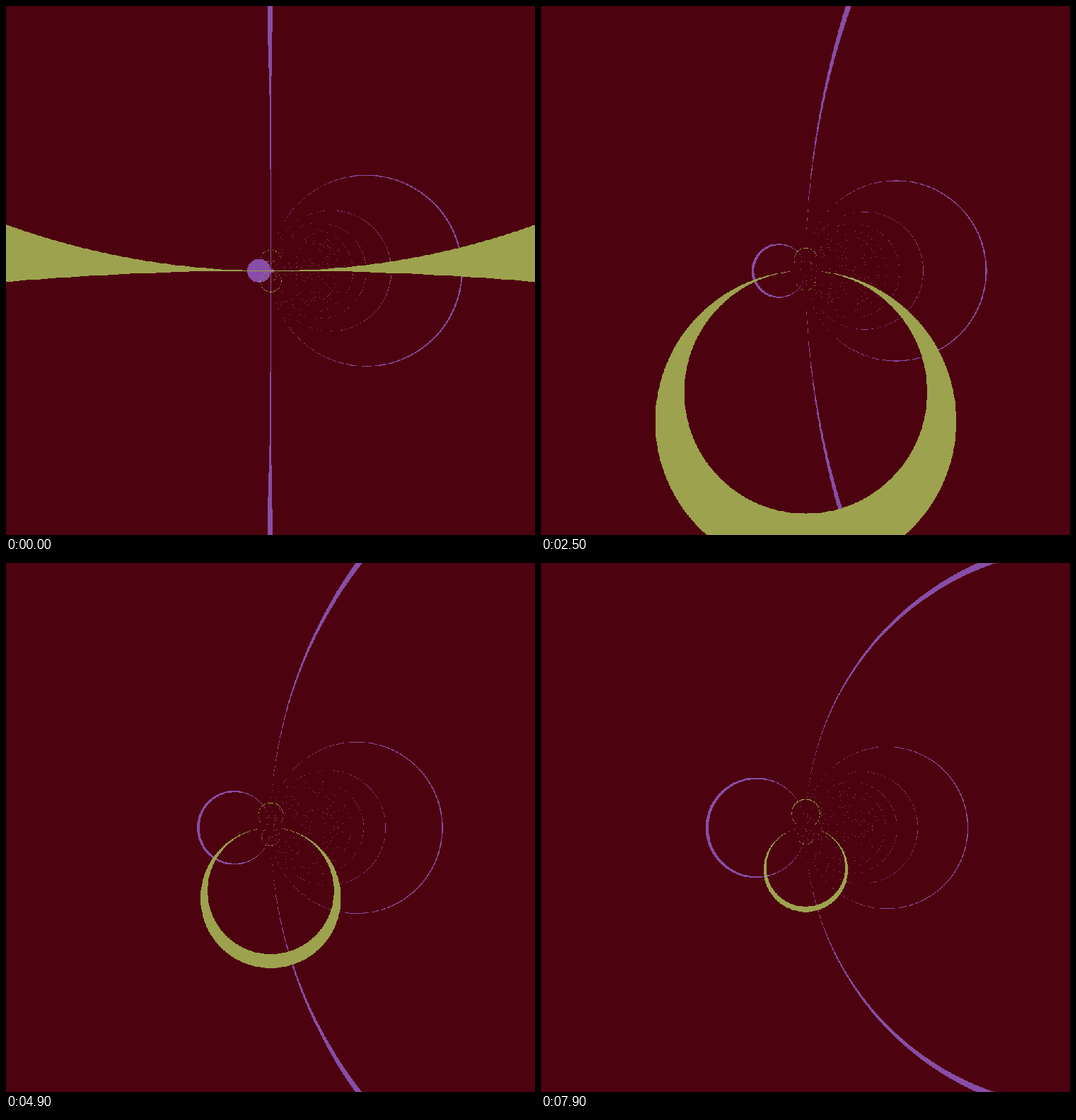
Recreate the animation shown at these times as an HTML page with a canvas. Size 748 px wide and 748 px high, loop 8 s.

```html
<!DOCTYPE html>
<html>
<head>
<meta charset="utf-8">
<style>
  html, body { margin: 0; width: 100%; height: 100%; overflow: hidden; background: #4d030f; }
  canvas { display: block; }
</style>
</head>
<body>
<canvas id="stage" width="748" height="748"></canvas>
<script>
const SIZE = 748, GRID = 1000, HALF = GRID / 2;
const STEPS = 300, FRAMES = 80, FRAME_MS = 100;
const RING_LEAD = 0.0068, RING_WIDTH = 0.0105;
const RAY_LEAD = 0.01345, RAY_WIDTH = 0.0168;
const ctx = document.getElementById('stage').getContext('2d');
const image = ctx.createImageData(SIZE, SIZE);
const pixels = new Uint32Array(image.data.buffer);
const rgb = (r, g, b) => (255 << 24 | b << 16 | g << 8 | r) >>> 0;
const BACK = rgb(77, 3, 15), RING = rgb(136, 77, 167), RAY = rgb(157, 162, 78);
const frac = v => v - Math.floor(v);

// The plane is sampled on a 1000-point grid, nearest point per pixel.
const toGrid = p => Math.floor((p + 0.5) * GRID / SIZE) - HALF;

// Polar form of exp(1 / 2z): fractional modulus and argument in turns.
const modulus = new Float64Array(SIZE * SIZE);
const turns = new Float64Array(SIZE * SIZE);
for (let i = 0; i < modulus.length; i++) {
  const x = toGrid(i % SIZE), y = toGrid(Math.floor(i / SIZE));
  const k = HALF / (x * x + y * y || 1) / 2;
  modulus[i] = frac(Math.exp(x * k));
  turns[i] = frac(y * k / (2 * Math.PI));
}

// Rings and rays drift by one step per frame.
function draw(frame) {
  const drift = frame / STEPS;
  for (let i = 0; i < pixels.length; i++) {
    pixels[i] = frac(turns[i] + RAY_LEAD - drift) < RAY_WIDTH ? RAY
      : frac(modulus[i] + RING_LEAD - drift) < RING_WIDTH ? RING : BACK;
  }
  ctx.putImageData(image, 0, 0);
}

const start = performance.now();
let shown = 0;
draw(0);
function tick() {
  const frame = Math.floor((performance.now() - start) / FRAME_MS) % FRAMES;
  if (frame !== shown) draw(shown = frame);
  requestAnimationFrame(tick);
}
requestAnimationFrame(tick);
</script>
</body>
</html>
```
